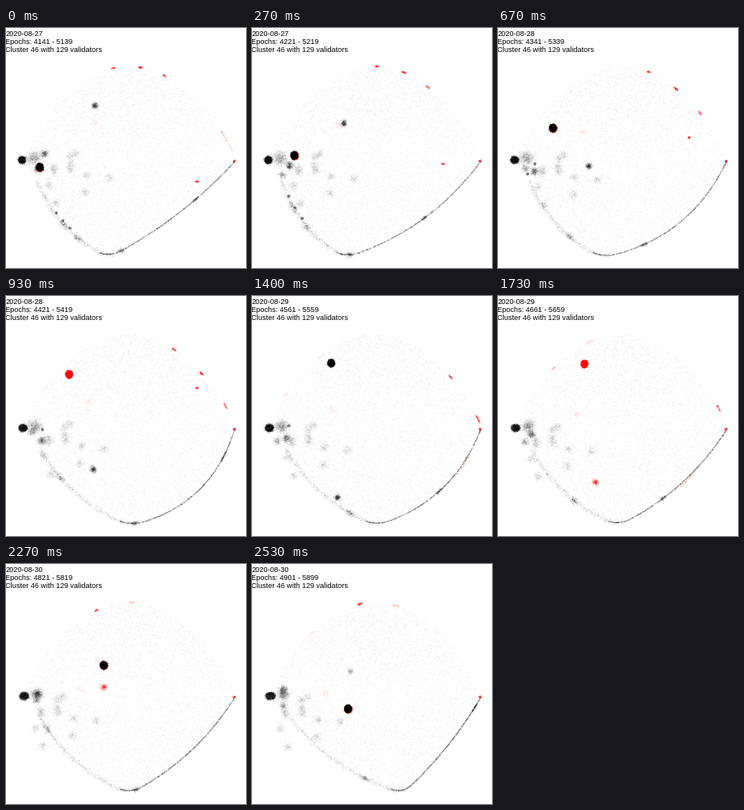
A matplotlib script for the animation above (2590 ms loop, 300 by 300 pixels).

```python
import numpy as np
import matplotlib.pyplot as plt
from matplotlib.animation import FuncAnimation

SIZE, STEPS, LOOP_MS = 300, 39, 2590
FIRST_EPOCH, EPOCH_STEP, WINDOW = 4141, 20, 998
EPOCH_DAYS, GENESIS_DAY = 384 / 86400, 4.547

LEFT, RIGHT = np.array([32, 172]), np.array([286, 167])
FLOW = 5.45  # pixels per step along the outline

# Key steps for the few parts that follow no simple rule
KEYS = np.array([0, 7, 14, 21, 26, 30, 38])
VERTEX_X = (128, 115, 155, 155, 150, 135, 188)
BULGE = (9, 22, 26, 22, 13, 16, 6)
MAIN_PATH = (42, 61, 79, 99, 108, 120, 120), (174, 146, 98, 84, 85, 87, 181)
SECOND_PATH = (111, 116, 109, 107, 122, 122, 123), (97, 140, 217, 252, 233, 182, 134)
MAIN_INK, SECOND_INK = "mmrkrmm", "kkkkrrg"


def glide(i, values):
    """Smooth cubic interpolation between the key steps."""
    values = np.asarray(values, float)
    slope = np.gradient(values, KEYS)
    k = min(np.searchsorted(KEYS, i, side="right") - 1, len(KEYS) - 2)
    h = KEYS[k + 1] - KEYS[k]
    t = (i - KEYS[k]) / h
    ease = t * t * (3 - 2 * t)
    return (values[k] + (values[k + 1] - values[k]) * ease
            + h * t * (1 - t) * ((1 - t) * slope[k] - t * slope[k + 1]))


def ink_at(i, inks):
    return inks[np.argmin(abs(KEYS - i))]


def top_y(x):
    s = np.clip((x - 22) / 264, 0, 1)
    return 166 - 118 * np.sin(np.pi * s) ** 0.72


def bowed(a, b, bulge):
    """Points on a quadratic curve from a to b, bent to its left side."""
    chord = b - a
    normal = np.array([chord[1], -chord[0]]) / np.hypot(*chord)
    control = (a + b) / 2 + 2 * bulge * normal
    t = np.linspace(0, 1, 120)[:, None]
    return (1 - t) ** 2 * a + 2 * t * (1 - t) * control + t ** 2 * b


def make_rim(i):
    """Lower outline from the right tip over the vertex to the left."""
    vertex = np.array([glide(i, VERTEX_X), 287])
    rim = np.vstack([bowed(RIGHT, vertex, glide(i, BULGE)),
                     bowed(vertex, LEFT, 17)])
    kernel = np.ones(25) / 25
    padded = np.pad(rim, ((12, 12), (0, 0)), mode="reflect", reflect_type="odd")
    return np.column_stack([np.convolve(padded[:, k], kernel, "valid")
                            for k in (0, 1)])


class Ink:
    """Black over red, both built up from many faint soft dots."""

    def __init__(self, i):
        self.rng = np.random.default_rng(100 + i)
        self.black, self.red = np.zeros((2, SIZE, SIZE))

    def stamp(self, layer, xy, alpha):
        corner = np.floor(xy - 0.5).astype(int)
        part = xy - 0.5 - corner
        for dx in (0, 1):
            for dy in (0, 1):
                x, y = (corner + (dx, dy)).T
                weight = abs(1 - dx - part[:, 0]) * abs(1 - dy - part[:, 1])
                ok = (x >= 0) & (x < SIZE) & (y >= 0) & (y < SIZE)
                total = np.bincount(y[ok] * SIZE + x[ok], weight[ok], SIZE * SIZE)
                layer -= total.reshape(SIZE, SIZE) * np.log(1 - alpha)

    def puff(self, layer, center, size, n, alpha):
        self.stamp(layer, center + self.rng.normal(0, 1, (n, 2)) * size, alpha)

    def disc(self, layer, center, size, n, alpha, rough=0.5):
        angle = self.rng.uniform(0, 2 * np.pi, n)
        radius = np.sqrt(self.rng.random(n))
        unit = np.column_stack([np.cos(angle), np.sin(angle)])
        points = center + unit * radius[:, None] * size
        self.stamp(layer, points + self.rng.normal(0, rough, (n, 2)), alpha)

    def pixels(self):
        dark, pale = np.exp(-self.black), np.exp(-self.red)
        return np.dstack([dark, dark * pale, dark * pale])


def draw_haze(ink, rim):
    x = np.linspace(22, 286, 300)
    edge = np.vstack([rim, np.column_stack([x, top_y(x)])])
    middle = np.array([150, 165])
    for layer, n, alpha in ((ink.black, 3200, 0.055), (ink.red, 600, 0.07)):
        rays = edge[ink.rng.integers(0, len(edge), n)] - middle
        ink.stamp(layer, middle + rays * ink.rng.random((n, 1)) ** 0.45, alpha)


def draw_rim(ink, rim):
    half = len(rim) // 2
    for part, n, spread, alpha in ((rim[:half + 10], 760, 0.35, 0.17),
                                   (rim[half - 5:-15], 480, 1.6, 0.1)):
        at = ink.rng.uniform(0, len(part) - 1, n)
        index = np.arange(len(part))
        points = np.column_stack([np.interp(at, index, part[:, k]) for k in (0, 1)])
        ink.puff(ink.black, points, spread, n, alpha)


def draw_rim_spots(ink, rim, i):
    def rim_y(x):
        return np.interp(x, rim[::-1, 0], rim[::-1, 1])

    for start in (72, 90, 144, 237, 348, 485):
        x = start - FLOW * i
        if 36 < x < 286:
            xs = x + ink.rng.uniform(-3, 3, 80)
            size = 0.5 + 2 * (1 - x / 286)
            ink.puff(ink.black, np.column_stack([xs, rim_y(xs)]), size, 80, 0.16)

    x = 378 - FLOW * i
    if 200 < x < 280:
        xs = x + ink.rng.uniform(-8, 8, 40)
        ink.puff(ink.red, np.column_stack([xs, rim_y(xs) + 3]), 0.4, 40, 0.2)

    for start in (63, 71, 80):
        x = start - 4.3 * i
        if x > 32:
            ink.disc(ink.black, (x, rim_y(x) - 4), 1.8, 60, 0.12, 0.2)
    if i < 25:
        ink.disc(ink.black, (46, 177 - 0.7 * i), 1.8, 60, 0.12, 0.2)


def draw_top_spots(ink, i):
    for start, reach, alpha in ((168, 2, 0.4), (198, 2, 0.25), (134, 2, 0.3),
                                (276, 7, 0.2), (-27, 4, 0.1), (-72, 2, 0.4),
                                (-134, 3, 0.1)):
        x = start + FLOW * i
        if 26 < x < 286:
            xs = x + ink.rng.uniform(-reach, reach, 40)
            fade = min(1, x / 140) ** 2
            ink.puff(ink.red, np.column_stack([xs, top_y(xs)]), 0.6, 40, alpha * fade)
    if i < 18:
        ink.puff(ink.red, (239, 192 - 5.5 * i), (1.1, 0.6), 30, 0.35)
    ink.puff(ink.red, RIGHT - (0.8, 0.5), 0.8, 32, 0.35)


def draw_patches(ink, t):
    homes = np.random.default_rng(4).normal((94, 174), (21, 20), (11, 2))
    for home in homes:
        ink.puff(ink.black, home + np.array([-18, 10]) * t, 2.8, 120, 0.06)
    ink.puff(ink.red, (110 - 18 * t, 118 + 44 * t), 2.5, 60, 0.05)


def draw_left_group(ink, t):
    ink.disc(ink.black, (20 + 3 * t, 165), (4.6 + 1.4 * t, 4.6), 900, 0.2, 0.7)
    ink.puff(ink.black, (23 + 3 * t, 165), 3, 150, 0.06)
    ink.puff(ink.black, (35 + 4 * t, 163), 4.8 - 1.2 * t, 700, 0.075)
    swing = np.sin(np.pi * t ** 0.7)
    ink.puff(ink.black, (48 - 9 * t, 157 + 24 * swing), 2.5, 300, 0.11)
    turn = 2 * np.pi * t
    ink.puff(ink.black, (35 + 4 * np.cos(turn), 177 + 7 * np.sin(2 * turn)), 2.3, 150, 0.1)


def draw_travellers(ink, i):
    center = np.array([glide(i, path) for path in MAIN_PATH])
    kind = ink_at(i, MAIN_INK)
    if kind in "km":
        ink.disc(ink.black, center, (4.3, 4.8), 900, 0.32, 0.6)
    if kind in "rm":
        shift = 0.5 if kind == "m" else 0
        ink.disc(ink.red, center + shift, (4.4, 4.8), 700, 0.35, 0.6)

    center = np.array([glide(i, path) for path in SECOND_PATH])
    kind = ink_at(i, SECOND_INK)
    layer = ink.red if kind == "r" else ink.black
    ink.puff(layer, center, 1.9, 260, 0.04 if kind == "g" else 0.14)


def picture(i):
    ink, rim, t = Ink(i), make_rim(i), i / (STEPS - 1)
    draw_haze(ink, rim)
    draw_rim(ink, rim)
    draw_rim_spots(ink, rim, i)
    draw_top_spots(ink, i)
    draw_patches(ink, t)
    draw_left_group(ink, t)
    draw_travellers(ink, i)
    return ink.pixels()


def caption(i):
    start = FIRST_EPOCH + EPOCH_STEP * i
    end = start + WINDOW
    day = int(GENESIS_DAY + end * EPOCH_DAYS)
    return (f"2020-08-{day:02d}", f"Epochs: {start} - {end}",
            "Cluster 46 with 129 validators")


fig = plt.figure(figsize=(3, 3), dpi=100, facecolor="white")
ax = fig.add_axes([0, 0, 1, 1])
ax.axis("off")
image = ax.imshow(np.ones((SIZE, SIZE, 3)), extent=(0, SIZE, SIZE, 0),
                  interpolation="nearest")
lines = [ax.text(-1, y, "", family="Liberation Sans", size=6.55, color="black",
                 va="baseline") for y in (10, 20, 30)]


def update(i):
    image.set_data(picture(i))
    for line, text in zip(lines, caption(i)):
        line.set_text(text)
    return [image, *lines]


anim = FuncAnimation(fig, update, frames=STEPS, interval=LOOP_MS / STEPS,
                     repeat=True, repeat_delay=0, blit=False)
plt.show()
```
